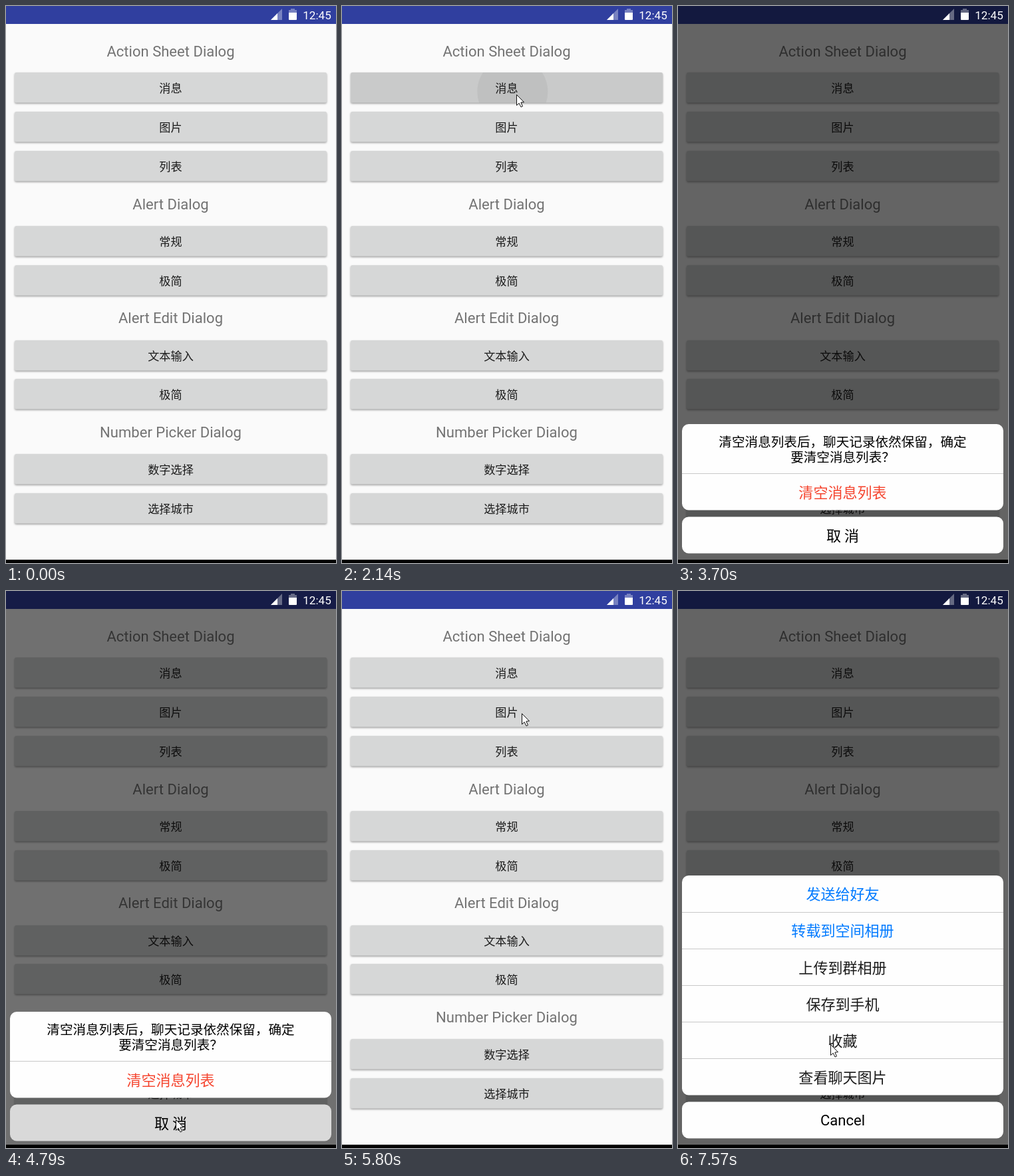
Recreate the animation shown at these times as an HTML page with a canvas. Size 496 by 838 pixels, loop 8 s.

```html
<!DOCTYPE html>
<html lang="zh-CN">
<head>
<meta charset="utf-8">
<title>Dialogs</title>
<style>
  html, body { margin: 0; width: 100%; height: 100%; overflow: hidden; background: #fafafa; }
  canvas { display: block; }
</style>
</head>
<body>
<canvas id="stage" width="496" height="838"></canvas>
<script>
const ctx = document.getElementById('stage').getContext('2d');
const LOOP = 8000, MID = 247.5;
const CJK = '"Noto Sans CJK SC", "Noto Sans CJK", sans-serif';
const LATIN = 'Roboto, sans-serif';

const titles = [['Action Sheet Dialog', 75.5], ['Alert Dialog', 305.5],
  ['Alert Edit Dialog', 477], ['Number Picker Dialog', 648.5]];
const buttons = [['消息', 100], ['图片', 159], ['列表', 218], ['常规', 331], ['极简', 390],
  ['文本输入', 503], ['极简', 561], ['数字选择', 674], ['选择城市', 733]];
const options = ['发送给好友', '转载到空间相册', '上传到群相册', '保存到手机', '收藏', '查看聊天图片'];

// Bursts of movement: first step, last step, number of steps. The picture holds between them.
const bursts = [[190, 420, 4], [650, 1440, 11], [2070, 2310, 4], [3480, 3700, 4], [4020, 4250, 4],
  [4630, 4630, 1], [4790, 5180, 6], [5410, 5800, 6], [6490, 7110, 9], [7270, 7570, 5]];

// Tracks: time, then values
const pointer = [[0, 390, 860], [190, 390, 787], [420, 284, 397], [580, 284, 397], [900, 304, 270],
  [1200, 272, 104], [1440, 262, 133], [3403, 262, 133], [3550, 267, 300], [3700, 258, 840],
  [3943, 258, 840], [4020, 256, 826], [4250, 255, 795], [4790, 255, 795], [4946, 242, 724],
  [5180, 276, 340], [5332, 276, 340], [5800, 270, 184], [6650, 270, 184], [7110, 229, 649],
  [7193, 229, 649], [7570, 229, 682]];
const dim = [[2102, 0], [2302, .6], [4776, .6], [4936, 0], [6519, 0], [6719, .6]];
const messageShown = [[2090, 0], [2290, 1], [4776, 1], [4936, 0]];
const optionsShown = [[6507, 0], [6707, 1]];
const presses = [{ start: 2070, y: 100, at: [262, 133] }, { start: 6490, y: 159, at: [270, 184] }];

const ease = p => (1 - Math.cos(p * Math.PI)) / 2;

function snap(t) {
  const run = bursts.filter(b => t >= b[0]).pop();
  if (!run) return 0;
  const [start, end, n] = run, step = (end - start) / (n - 1) || 1;
  return start + step * Math.min(n - 1, Math.floor((t - start) / step + .12));
}

function track(keys, t) {
  const i = keys.findIndex(k => k[0] > t);
  if (i < 1) return keys.at(i).slice(1);
  const a = keys[i - 1], b = keys[i], p = (t - a[0]) / (b[0] - a[0]);
  return a.slice(1).map((v, j) => v + (b[j + 1] - v) * p);
}

function text(str, y, size, color, font = CJK, x = MID) {
  ctx.font = size + 'px ' + font;
  ctx.fillStyle = color;
  ctx.textAlign = 'center';
  ctx.fillText(str, x, y);
}

// CJK text centred on y
const label = (str, y, size, color) => text(str, y + size * .38, size, color);

function rect(x, y, w, h, color) {
  ctx.fillStyle = color;
  ctx.fillRect(x, y, w, h);
}

function round(x, y, w, h, r, color) {
  ctx.beginPath();
  ctx.roundRect(x, y, w, h, r);
  ctx.fillStyle = color;
  ctx.fill();
}

function polygon(points, color) {
  ctx.beginPath();
  points.forEach(p => ctx.lineTo(...p));
  ctx.closePath();
  ctx.fillStyle = color;
  ctx.fill();
}

function drawPress({ start, y, at }, t) {
  const dt = t - start;
  if (dt < 0 || dt > 260) return;
  const a = Math.min(1, (260 - dt) / 180);
  const cx = at[0] + (MID - at[0]) * .39, cy = at[1] + (y + 22.5 - at[1]) * .39;
  ctx.save();
  round(13, y, 469, 45.5, 2.5, `rgba(0,0,0,${.06 * a})`);
  ctx.clip();
  ctx.beginPath();
  ctx.arc(cx, cy, 53 + 51 * (1 - Math.exp(-dt / 110)), 0, 7);
  ctx.fillStyle = `rgba(0,0,0,${.05 * a})`;
  ctx.fill();
  ctx.restore();
}

function drawPage(t) {
  rect(0, 0, 496, 838, '#fafafa');
  rect(0, 0, 496, 27, '#303f9f');
  for (const [str, y] of titles) text(str, y, 22.05, '#737373', LATIN);
  for (const [, y] of buttons) {
    ctx.save();
    ctx.shadowColor = 'rgba(0,0,0,.36)';
    ctx.shadowBlur = 3;
    ctx.shadowOffsetY = 1.5;
    round(13, y, 469, 45.5, 2.5, '#d6d7d7');
    ctx.restore();
  }
  presses.forEach(p => drawPress(p, t));
  for (const [str, y] of buttons) label(str, y + 23.3, 17.15, '#1c1c1c');
}

function drawStatus() {
  polygon([[398, 21], [415, 21], [415, 4]], 'rgba(255,255,255,.35)');
  polygon([[398, 21], [408, 21], [408, 11]], '#fff');
  rect(428, 4, 6, 2, 'rgba(255,255,255,.35)');
  rect(425, 6, 12, 4, 'rgba(255,255,255,.35)');
  round(425, 10, 12, 11, [0, 0, 1, 1], '#fff');
  text('12:45', 19.5, 17.15, '#fff', LATIN, 467.5);
  ctx.font = '';
}

// Slides a sheet and its cancel button up from below; top is the resting edge.
function drawSheet(top, shown, cancelColor, drawBody) {
  if (shown <= 0) return;
  ctx.save();
  ctx.translate(0, Math.round((1 - ease(shown)) * (833 - top)));
  round(6, top, 483, 758.5 - top, 10, '#fefefe');
  round(6, 768.5, 483, 55, 10, cancelColor);
  drawBody();
  ctx.restore();
}

const divider = y => rect(6, y, 483, 1, '#c8c8c8');

function drawMessage() {
  label('清空消息列表后，聊天记录依然保留，确定', 655.5, 19.6, '#000');
  label('要清空消息列表？', 679, 19.6, '#000');
  divider(703);
  label('清空消息列表', 731.5, 22.05, '#f5452f');
  label('取 消', 796.5, 22.05, '#000');
}

function drawOptions() {
  options.forEach((str, i) => {
    const y = 428 + i * 55.1;
    if (i) divider(Math.round(y - .6));
    label(str, y + 28, 22.05, i < 2 ? '#007aff' : '#1c1c1c');
  });
  text('Cancel', 804, 22.05, '#000', LATIN);
}

function drawPointer([x, y]) {
  ctx.save();
  ctx.translate(Math.round(x) + .5, Math.round(y) + .5);
  polygon([[0, 0], [0, 16], [3.7, 12.7], [6.5, 18.5], [9, 17.4], [6.4, 11.6], [11, 11.2]], '#fff');
  ctx.strokeStyle = '#111';
  ctx.lineWidth = 1;
  ctx.stroke();
  ctx.restore();
}

function draw(now) {
  const t = snap(now % LOOP);
  drawPage(t);
  rect(0, 0, 496, 838, `rgba(0,0,0,${track(dim, t)[0]})`);
  drawStatus();
  rect(0, 833, 496, 5, '#000');
  drawSheet(629, track(messageShown, t)[0], t >= 4630 ? '#d9d9d9' : '#fefefe', drawMessage);
  drawSheet(428, track(optionsShown, t)[0], '#fefefe', drawOptions);
  drawPointer(track(pointer, t));
}

let origin;
function loop(now) {
  origin ??= now;
  draw(now - origin);
  requestAnimationFrame(loop);
}
requestAnimationFrame(loop);
</script>
</body>
</html>
```
